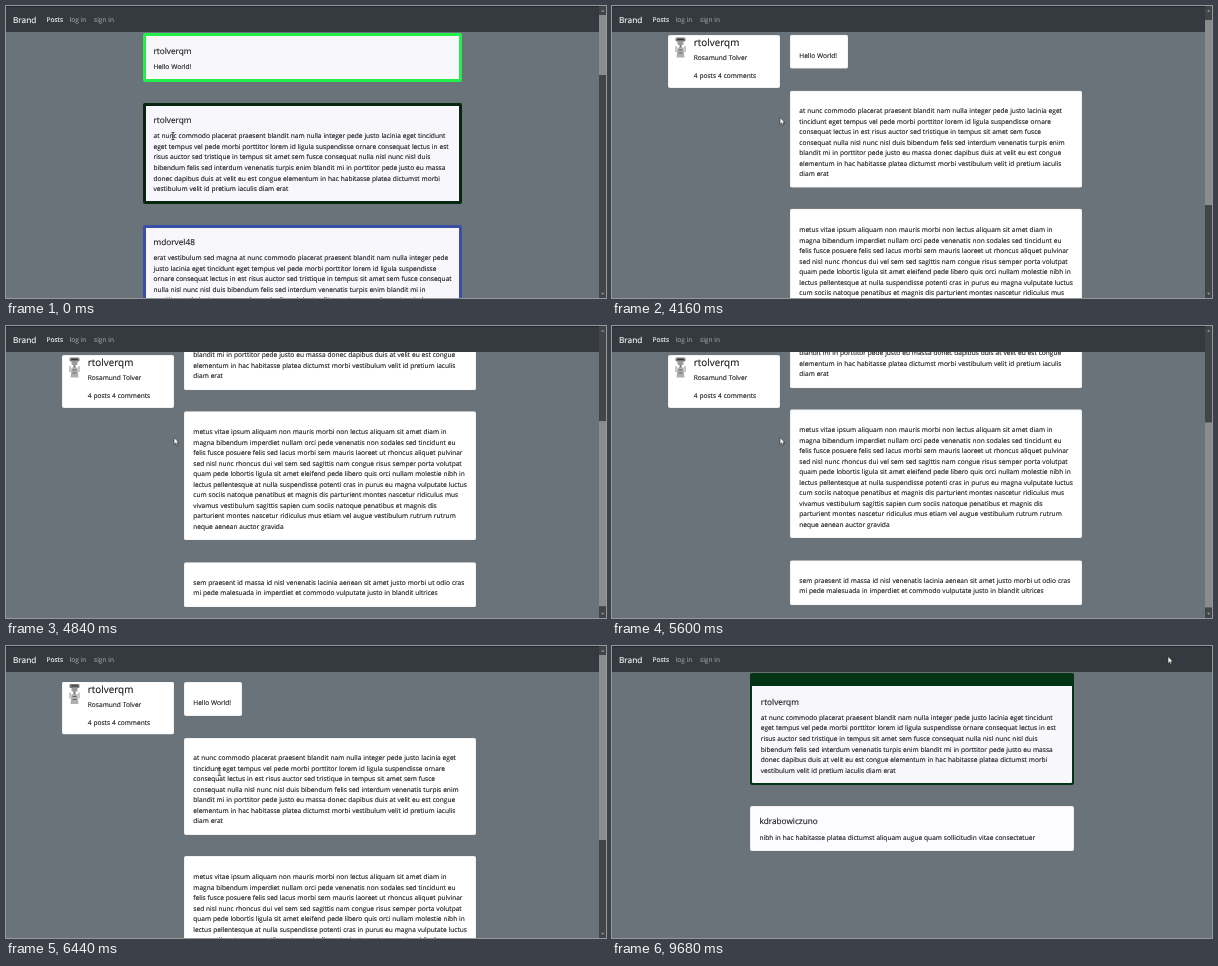
Recreate the animation shown at these times as an HTML page. Size 600 px wide and 292 px high, loop 9840 ms.

```html
<!DOCTYPE html>
<html lang="en">
<head>
<meta charset="utf-8">
<title>Posts</title>
<style>
  html, body { margin: 0; width: 100%; height: 100%; overflow: hidden; }
  body {
    position: relative; background: #6b737a; color: #16191c;
    font: 6.58px/10.55px "Open Sans", "Noto Sans", sans-serif;
    word-spacing: .2px; text-rendering: geometricPrecision;
    -webkit-text-stroke: .12px currentColor;
  }
  .stage { position: absolute; left: 0; top: 0; width: 600px; height: 292px; overflow: hidden; }
  .stage * { box-sizing: border-box; animation-duration: 9840ms; animation-iteration-count: infinite; animation-timing-function: linear; }

  /* --x/--y: left edge and top; --w/--h: size */
  .card, p { position: absolute; margin: 0; left: calc(var(--x) * 1px); top: calc(var(--y) * 1px); }
  .card { width: calc(var(--w) * 1px); height: calc(var(--h) * 1px); background: #fff; border-radius: 2px; }
  p { white-space: pre; }
  .name { font-size: 8.25px; line-height: 11px; }
  .big { font-size: 9.9px; line-height: 13px; }
  .edge { border: 3px solid var(--c); background: #f8f7fc; }
  .plain { border: 1px solid rgba(0, 0, 0, .05); }

  nav { position: absolute; z-index: 1; left: 0; top: 0; width: 600px; height: 26px; background: #343a40; border-top: 1px solid #23272b; color: #9a9da0; }
  nav p { --y: 8; }
  nav .on { color: #fff; }

  .bar { position: absolute; z-index: 2; left: 592.5px; top: 0; width: 7.5px; height: 292px; background: #424548; }
  .bar svg { position: absolute; left: 0; top: 0; }
  .thumb { position: absolute; left: .5px; width: 6.5px; top: 9px; height: 60px; background: #8b8c8e; }

  .home { animation-name: home; }
  .profile { animation-name: profile; }
  .post { animation-name: post; }
  .home, .profile, .post { animation-timing-function: step-end !important; }
  @keyframes home { 0% { visibility: visible } 33.74%, 100% { visibility: hidden } }
  @keyframes profile { 0% { visibility: hidden } 33.74% { visibility: visible } 69.1%, 100% { visibility: hidden } }
  @keyframes post { 0% { visibility: hidden } 69.1%, 100% { visibility: visible } }

  /* --k: pixels moved per pixel scrolled */
  .scroll { position: absolute; inset: 0; --k: -1px; animation-name: scroll; }
  .profile .thumb { height: 185px; --k: .69px; animation-name: scroll; }
  @keyframes scroll {
    0%, 41.87% { transform: translateY(0) }
    45.94% { transform: translateY(calc(var(--k) * 72)); animation-timing-function: ease-out }
    49.8%, 56.91% { transform: translateY(calc(var(--k) * 127)) }
    60.98% { transform: translateY(calc(var(--k) * 13)) }
    61.79%, 100% { transform: translateY(0) }
  }
  .sticky { position: absolute; left: 0; top: 0; animation-name: sticky; }
  @keyframes sticky {
    0%, 41.87% { transform: translateY(6.5px) }
    42.24%, 61.38% { transform: none }
    61.79%, 100% { transform: translateY(6.5px) }
  }

  .cursor { position: absolute; z-index: 3; left: 0; top: 0; overflow: visible; animation-name: move; }
  @keyframes move {
    0%, 13.82% { transform: translate(167px, 130px) }
    23.58%, 23.98% { transform: translate(170px, 122px) }
    28.46%, 33.74% { transform: translate(172px, 116px); animation-timing-function: ease-out }
    36.6%, 61.79% { transform: translate(168px, 111.5px); animation-timing-function: ease-in-out }
    66.67%, 78.46% { transform: translate(220px, 128px); animation-timing-function: ease-in-out }
    87.8%, 89.02% { transform: translate(240px, 144px); animation-timing-function: ease-in-out }
    96% { transform: translate(568px, 18px); animation-timing-function: ease-out }
    98.37%, 100% { transform: translate(556px, 10.5px) }
  }
  .beam { animation-name: beam; }
  .arrow { animation-name: arrow; }
  .beam, .arrow { animation-timing-function: step-end !important; }
  @keyframes beam { 0% { opacity: 1 } 33.74% { opacity: 0 } 64% { opacity: 1 } 91.4%, 100% { opacity: 0 } }
  @keyframes arrow { 0% { opacity: 0 } 33.74% { opacity: 1 } 64% { opacity: 0 } 91.4%, 100% { opacity: 1 } }
</style>
</head>
<body>
<div class="stage">
  <nav>
    <p class="name on" style="--x:7">Brand</p>
    <p class="on" style="--x:40.5">Posts</p>
    <p style="--x:63.5">log in</p>
    <p style="--x:88">sign in</p>
  </nav>

  <section class="home">
    <div class="card edge" style="--x:136.5;--y:27;--w:319.5;--h:49;--c:#22ee4c"></div>
    <p class="name" style="--x:147.5;--y:39.7">rtolverqm</p>
    <p style="--x:147.5;--y:56">Hello World!</p>

    <div class="card edge" style="--x:136.5;--y:97;--w:319.5;--h:101;--c:#06260f"></div>
    <p class="name" style="--x:147.5;--y:109">rtolverqm</p>
    <p style="--x:147.5;--y:125.4">at nunc commodo placerat praesent blandit nam nulla integer pede justo lacinia eget tincidunt
eget tempus vel pede morbi porttitor lorem id ligula suspendisse ornare consequat lectus in est
risus auctor sed tristique in tempus sit amet sem fusce consequat nulla nisl nunc nisl duis
bibendum felis sed interdum venenatis turpis enim blandit mi in porttitor pede justo eu massa
donec dapibus duis at velit eu est congue elementum in hac habitasse platea dictumst morbi
vestibulum velit id pretium iaculis diam erat</p>

    <div class="card edge" style="--x:136.5;--y:219;--w:319.5;--h:101;--c:#3950a6"></div>
    <p class="name" style="--x:147.5;--y:231">mdorvel48</p>
    <p style="--x:147.5;--y:247.3">erat vestibulum sed magna at nunc commodo placerat praesent blandit nam nulla integer pede
justo lacinia eget tincidunt eget tempus vel pede morbi porttitor lorem id ligula suspendisse
ornare consequat lectus in est risus auctor sed tristique in tempus sit amet sem fusce consequat
nulla nisl nunc nisl duis bibendum felis sed interdum venenatis turpis enim blandit mi in
porttitor pede justo eu massa donec dapibus duis at velit eu est congue elementum in hac</p>

    <div class="bar">
      <svg width="7.5" height="292" fill="#8a8d90"><path d="M2 5.7h3.5L3.7 3.6zM2 286.8h3.5l-1.8 2.1z"/></svg>
      <div class="thumb"></div>
    </div>
  </section>

  <section class="profile">
    <div class="scroll">
      <div class="card plain" style="--x:178;--y:35.5;--w:57.5;--h:34.5"></div>
      <p style="--x:187.3;--y:51.6">Hello World!</p>

      <div class="card plain" style="--x:178;--y:91.5;--w:292;--h:97.5"></div>
      <p style="--x:187.3;--y:107.2">at nunc commodo placerat praesent blandit nam nulla integer pede justo lacinia eget
tincidunt eget tempus vel pede morbi porttitor lorem id ligula suspendisse ornare
consequat lectus in est risus auctor sed tristique in tempus sit amet sem fusce
consequat nulla nisl nunc nisl duis bibendum felis sed interdum venenatis turpis enim
blandit mi in porttitor pede justo eu massa donec dapibus duis at velit eu est congue
elementum in hac habitasse platea dictumst morbi vestibulum velit id pretium iaculis
diam erat</p>

      <div class="card plain" style="--x:178;--y:210;--w:292;--h:129"></div>
      <p style="--x:187.3;--y:226">metus vitae ipsum aliquam non mauris morbi non lectus aliquam sit amet diam in
magna bibendum imperdiet nullam orci pede venenatis non sodales sed tincidunt eu
felis fusce posuere felis sed lacus morbi sem mauris laoreet ut rhoncus aliquet pulvinar
sed nisl nunc rhoncus dui vel sem sed sagittis nam congue risus semper porta volutpat
quam pede lobortis ligula sit amet eleifend pede libero quis orci nullam molestie nibh in
lectus pellentesque at nulla suspendisse potenti cras in purus eu magna vulputate luctus
cum sociis natoque penatibus et magnis dis parturient montes nascetur ridiculus mus
vivamus vestibulum sagittis sapien cum sociis natoque penatibus et magnis dis
parturient montes nascetur ridiculus mus etiam vel augue vestibulum rutrum rutrum
neque aenean auctor gravida</p>

      <div class="card plain" style="--x:178;--y:360.5;--w:292;--h:45"></div>
      <p style="--x:187.3;--y:376.6">sem praesent id massa id nisl venenatis lacinia aenean sit amet justo morbi ut odio cras
mi pede malesuada in imperdiet et commodo vulputate justo in blandit ultrices</p>
    </div>

    <div class="sticky">
      <div class="card plain" style="--x:56;--y:29;--w:112;--h:53"></div>
      <svg style="position:absolute;left:60px;top:30px" width="18" height="23">
        <path d="M4 10v6M13 10v6" stroke="#a5a5a5" stroke-width="1.2"/>
        <path d="M8.5 8v5" stroke="#777" stroke-width="2"/>
        <rect x="3.5" y="1.5" width="10" height="4" rx="1.5" fill="#777"/>
        <rect x="5.5" y="5" width="6" height="4" rx="1" fill="#9b9b9b"/>
        <path d="M5.5 3.5h6" stroke="#333" stroke-width="1.2"/>
        <path d="M5.5 11.5h6l1 10h-8z" fill="#b0b0b0"/>
        <path d="M6.5 14h4M6.5 17h4" stroke="#666"/>
      </svg>
      <p class="big" style="--x:81.8;--y:30.2">rtolverqm</p>
      <p style="--x:81.8;--y:47.1">Rosamund Tolver</p>
      <p style="--x:81.8;--y:64.8">4 posts 4 comments</p>
    </div>

    <div class="bar">
      <svg width="7.5" height="292" fill="#8a8d90"><path d="M2 5.7h3.5L3.7 3.6zM2 286.8h3.5l-1.8 2.1z"/></svg>
      <div class="thumb"></div>
    </div>
  </section>

  <section class="post">
    <div class="card" style="--x:138;--y:27;--w:324;--h:112;background:#043414"></div>
    <div class="card" style="--x:140.3;--y:40;--w:319.4;--h:96.7;background:#f8f7fc;border-radius:0 0 1px 1px"></div>
    <p class="name" style="--x:148.8;--y:50.6">rtolverqm</p>
    <p style="--x:148.8;--y:66.9">at nunc commodo placerat praesent blandit nam nulla integer pede justo lacinia eget tincidunt
eget tempus vel pede morbi porttitor lorem id ligula suspendisse ornare consequat lectus in est
risus auctor sed tristique in tempus sit amet sem fusce consequat nulla nisl nunc nisl duis
bibendum felis sed interdum venenatis turpis enim blandit mi in porttitor pede justo eu massa
donec dapibus duis at velit eu est congue elementum in hac habitasse platea dictumst morbi
vestibulum velit id pretium iaculis diam erat</p>

    <div class="card plain" style="--x:138;--y:160;--w:324;--h:45;background:#fdfcff"></div>
    <p class="name" style="--x:147.5;--y:170.4">kdrabowiczuno</p>
    <p style="--x:147.5;--y:186.6">nibh in hac habitasse platea dictumst aliquam augue quam sollicitudin vitae consectetuer</p>
  </section>

  <svg class="cursor" width="1" height="1">
    <path class="beam" d="M-1.5-3.5h3M0-3.5v7M-1.5 3.5h3" fill="none" stroke="#222" stroke-width=".8"/>
    <path class="arrow" d="M0 0v7l1.6-1.5 1.1 2.5 1.1-.5-1-2.4h2.2z" fill="#fff" stroke="#222" stroke-width=".6"/>
  </svg>
</div>
</body>
</html>
```
